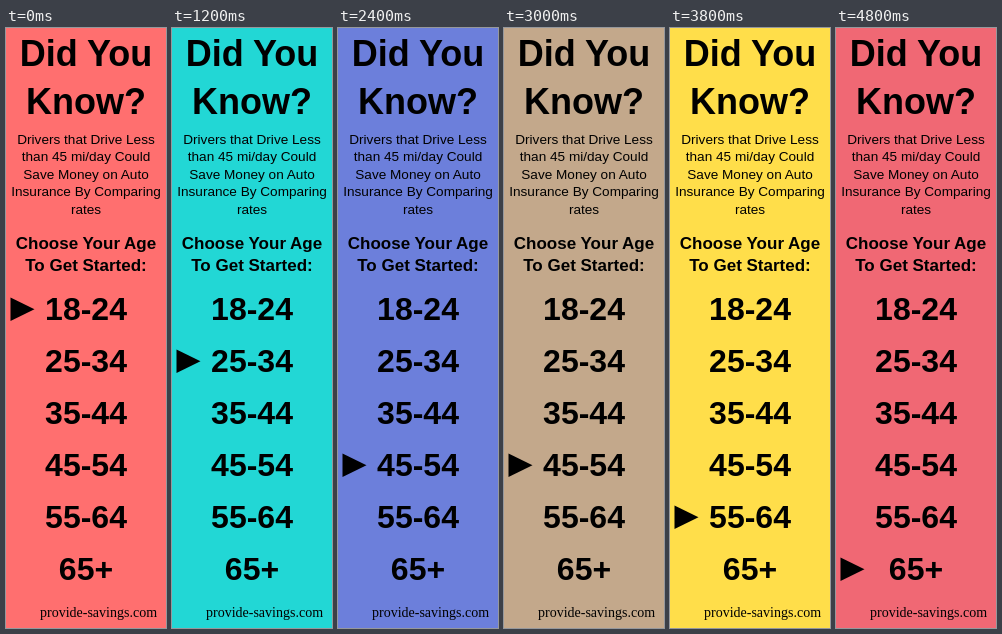
An HTML page that plays this animation: 160x600 px, repeating every 5 s.

```html
<!DOCTYPE html>
<html lang="en">
<head>
<meta charset="utf-8">
<title>Choose Your Age</title>
<style>
  html, body { margin: 0; width: 100%; height: 100%; overflow: hidden; }
  svg { display: block; width: 160px; height: 600px; }
  text { font-family: "Liberation Sans", Arial, sans-serif; text-anchor: middle; }
  .title { font-size: 36px; font-weight: bold; }
  .body { font-size: 13.6px; }
  .prompt { font-size: 17px; font-weight: bold; }
  .age { font-size: 32px; font-weight: bold; }
  .site { font-family: "Liberation Serif", Times, serif; font-size: 14px; }
</style>
</head>
<body>
<svg id="stage" viewBox="0 0 160 600">
  <rect id="back" width="160" height="600"/>
  <path id="arrow" d="M4.5 269.5L28.5 281.3L4.5 293Z"/>
</svg>
<script>
const stage = document.getElementById("stage");
const back = document.getElementById("back");
const arrow = document.getElementById("arrow");

const LOOP = 5000, STEP = 200, ROW = 52, STEPS_PER_ROW = 4;

// Background colours: [step, red, green, blue]
const stops = [
  [0, 255, 111, 111],
  [3, 173, 198, 174],
  [6, 34, 215, 213],
  [9, 34, 215, 213],
  [12, 108, 127, 219],
  [17, 253, 196, 86],
  [19, 255, 222, 74],
  [20, 255, 229, 71],
  [21, 255, 229, 71],
  [24, 240, 104, 116]
];

function addLines(className, y, pitch, lines) {
  lines.forEach((line, i) => {
    const text = document.createElementNS(stage.namespaceURI, "text");
    text.setAttribute("class", className);
    text.setAttribute("x", className === "site" ? 92.5 : 80);
    text.setAttribute("y", y + i * pitch);
    text.textContent = line;
    stage.append(text);
  });
}

addLines("title", 37.5, 48, ["Did You", "Know?"]);
addLines("body", 115.5, 17.5, [
  "Drivers that Drive Less",
  "than 45 mi/day Could",
  "Save Money on Auto",
  "Insurance By Comparing",
  "rates"
]);
addLines("prompt", 221, 22, ["Choose Your Age", "To Get Started:"]);
addLines("age", 292, ROW, ["18-24", "25-34", "35-44", "45-54", "55-64", "65+"]);
addLines("site", 589, 0, ["provide-savings.com"]);

function colorAt(step) {
  const next = Math.max(1, stops.findIndex(stop => stop[0] >= step));
  const [from, ...a] = stops[next - 1];
  const [to, ...b] = stops[next];
  const k = (step - from) / (to - from);
  return `rgb(${a.map((v, i) => Math.round(v + (b[i] - v) * k))})`;
}

function draw() {
  const step = Math.floor(performance.now() % LOOP / STEP);
  const row = Math.min(5, Math.floor(step / STEPS_PER_ROW));
  back.setAttribute("fill", colorAt(step));
  arrow.setAttribute("transform", `translate(0 ${row * ROW})`);
  requestAnimationFrame(draw);
}
draw();
</script>
</body>
</html>
```
